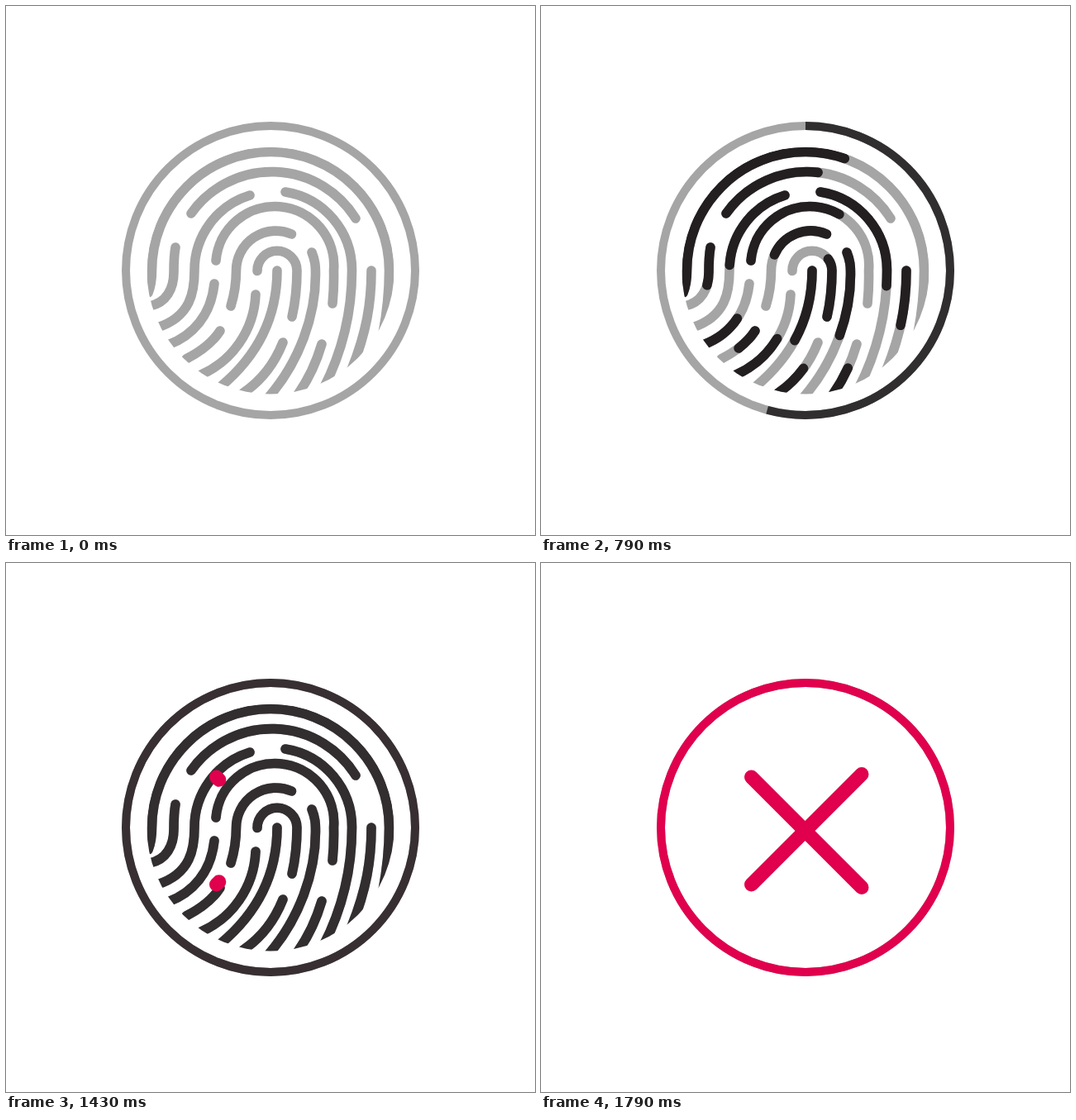
Write an HTML page that moves like this. It is 640 by 640 pixels and loops after 2640 ms.

```html
<!DOCTYPE html>
<html lang="en">
<head>
<meta charset="utf-8">
<title>Fingerprint rejected</title>
<style>
  html, body { margin: 0; width: 100%; height: 100%; overflow: hidden; background: #fff; }
  svg { display: block; width: 100%; height: 100%; fill: none; }
  .print { stroke-width: 11.6; stroke-linecap: round; }
  .ring { stroke-width: 10; }
  .base { stroke: #a6a5a5; }
  #ink { stroke: #231f20; }
  #cross { stroke: #e0004d; stroke-width: 17; stroke-linecap: round; }
</style>
</head>
<body>
<svg viewBox="0 0 640 640">
  <defs>
    <clipPath id="pad"><circle cx="320" cy="320" r="149.6"/></clipPath>
    <g id="ridges">
      <path pathLength="1" d="M172 347Q176.5 336 176.5 320A143.5 143.5 0 0 1 463.5 320C463.5 345 461 370 456 396"/>
      <path pathLength="1" d="M224 251A119.5 119.5 0 0 1 423 257"/>
      <path pathLength="1" d="M338 225A95.5 95.5 0 0 1 418.5 320C418.5 372 407 418 384 463"/>
      <path pathLength="1" d="M295 229A95 95 0 0 0 228 320C228 345 224 376 183 389"/>
      <path pathLength="1" d="M205 292C203 303 203 310 203 322C203 342 194 359 174 363"/>
      <path pathLength="1" d="M254 308A71.5 71.5 0 0 1 396.5 320Q397 340 395 360"/>
      <path pathLength="1" d="M345.5 276A48 48 0 0 0 278.5 320C278.5 338 276 350 272 363"/>
      <path pathLength="1" d="M346 376Q352 350 352 320A24 24 0 0 0 304 320.5"/>
      <path pathLength="1" d="M328 320C328 375 306 422 259 461"/>
      <path pathLength="1" d="M196 410C226 399 248 374 252 336"/>
      <path pathLength="1" d="M236 446C273 430 300 393 302 349"/>
      <path pathLength="1" d="M259 393Q246 413 218 427"/>
      <path pathLength="1" d="M287 468C308 454 325 432 335 407"/>
      <path pathLength="1" d="M370 298C374 308 374.5 314 374.5 325C374.5 375 355 430 318 473"/>
      <path pathLength="1" d="M353 470Q372 443 382 409"/>
      <path pathLength="1" d="M442 320C442 360 436 395 418 440"/>
    </g>
  </defs>
  <g id="print" class="print" clip-path="url(#pad)">
    <use href="#ridges" class="base"/>
    <use href="#ridges" id="ink"/>
  </g>
  <g class="ring" transform="rotate(-90 320 320)">
    <circle class="base" cx="320" cy="320" r="175"/>
    <circle id="sweep" cx="320" cy="320" r="175" pathLength="1"/>
  </g>
  <path id="cross"/>
</svg>
<script>
  const LOOP = 2640, STEP = 500 / 7, SCAN_STEPS = 15.5, REJECT_STEP = 20;
  const [print, ink, sweep, cross] =
    ['print', 'ink', 'sweep', 'cross'].map(id => document.getElementById(id));

  const rejectSteps = [
    { ring: '#372f32', fade: 0.93, reach: 0.025 },
    { ring: '#6b3345', fade: 0.45, reach: 0.36 },
    { ring: '#a3365b', fade: 0, reach: 0.775 },
    { ring: '#c71c54', fade: 0, reach: 0.94 },
    { ring: '#da0750', fade: 0, reach: 0.99 },
    { ring: '#e0004d', fade: 0, reach: 1 }
  ];

  // Cubic bezier easing with control points (0.81, 0) and (0.7, 1).
  function ease(x) {
    if (x >= 1) return 1;
    let low = 0, high = 1;
    for (let i = 0; i < 24; i++) {
      const s = (low + high) / 2, r = 1 - s;
      if (2.43 * s * r * r + 2.1 * s * s * r + s * s * s < x) low = s;
      else high = s;
    }
    return low * low * (3 - 2 * low);
  }

  function reveal(element, amount) {
    element.style.display = amount > 0 ? '' : 'none';
    element.style.strokeDasharray = amount < 1 ? `${amount} 2` : 'none';
  }

  function draw(time) {
    const step = Math.floor((time % LOOP + 4.9) / STEP);
    const scan = step ? ease(step / SCAN_STEPS) : 0;
    const reject = step < REJECT_STEP ? null
      : rejectSteps[Math.min(step - REJECT_STEP, rejectSteps.length - 1)];

    reveal(ink, scan);
    reveal(sweep, scan);
    sweep.style.stroke = reject ? reject.ring : '#302e2f';
    print.style.opacity = reject ? reject.fade : 1;

    const d = reject ? 133.5 * reject.reach : 0;
    cross.style.display = reject ? '' : 'none';
    cross.setAttribute('d', `M254.5 259l${d} ${d}M254.5 389l${d} ${-d}`);
  }

  const start = performance.now();
  function tick() {
    draw(performance.now() - start);
    requestAnimationFrame(tick);
  }
  tick();
</script>
</body>
</html>
```
